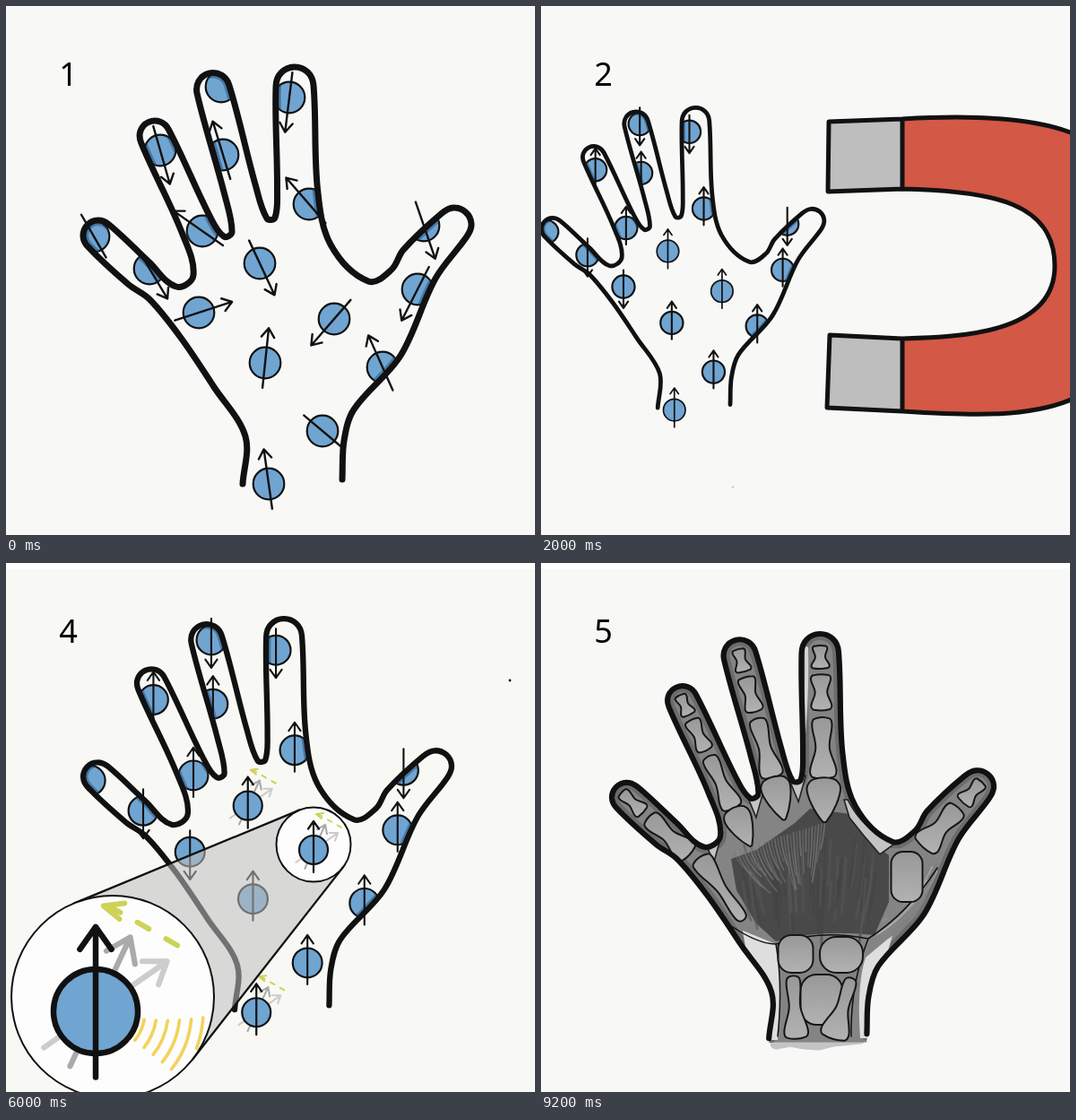
These frames come from a looping animation (590x590 px, 10000 ms). An HTML page:

```html
<!DOCTYPE html>
<html lang="en">
<head>
<meta charset="utf-8">
<title>How an MRI scan works</title>
<style>
  html, body { margin: 0; width: 100%; height: 100%; overflow: hidden; background: #f8f8f6; }
  svg { display: block; width: 590px; height: 590px; }
  .scene { visibility: hidden; animation: show 10s step-end infinite; }
  @keyframes show { 0% { visibility: visible; } 20%, 100% { visibility: hidden; } }
  text { font: 36px "Noto Sans", "Open Sans", sans-serif; fill: #000; text-anchor: middle; }
  .ink { fill: none; stroke: #111; stroke-linecap: round; stroke-linejoin: round; }
  .blue { fill: #70a4d1; stroke: #111; }
  .lens { fill: #fdfdfd; stroke: #111; stroke-width: 2; }
  .bone { fill: url(#boneTone); stroke: #161616; stroke-width: 2; }
</style>
</head>
<body>
<svg id="stage" viewBox="0 0 590 590"></svg>
<script>
// Each finger: tip x, y, radius, then base x, y, radius; pinky to thumb
const FINGERS = [
  [103, 256, 17, 148, 298, 17],
  [166, 145, 17, 212, 244, 18],
  [231, 93, 18.5, 261, 205, 18],
  [322, 89, 21, 325, 205, 22.5],
  [500, 244, 19, 461, 288, 24]
];
const WRIST = [[264, 533], [267, 480], [232, 425], [195, 370], [160, 327]];
// Skin that follows each finger
const GAPS = [
  [[190, 313], [209, 300]],
  [[243, 257], [252, 252]],
  [[291, 237], [300, 236]],
  [[362, 266], [404, 307], [430, 294]],
  [[440, 390], [388, 450], [377, 485], [375, 528]]
];

// Each spin: x, y, random heading in degrees, then +1 or -1 once aligned, or TUNED
const TUNED = 2;
const ZOOMED = [366, 349, 221, TUNED];
const SPINS = [
  [98, 257, 150, 0, 'bare'], [172, 161, 164, 1], [240, 90, null, -1], [242, 166, -17, 1],
  [316, 102, 187, -1], [338, 221, -41, 1], [219, 251, -55, 1], [160, 293, 149, -1],
  [283, 287, 155, TUNED], [215, 342, 72, -1], ZOOMED, [289, 398, 6, 1], [293, 533, -8, TUNED],
  [353, 474, -50, 1, 'bare'], [459, 316, 207, 1], [420, 403, -24, 1], [466, 245, 161, -1]
];

// Smooth curve through points, with handles a third of each segment
function smooth(p, closed) {
  const n = p.length;
  const at = i => closed ? p[(i + n) % n] : p[Math.max(0, Math.min(n - 1, i))];
  const handle = (i, len) => {
    const dx = at(i + 1)[0] - at(i - 1)[0], dy = at(i + 1)[1] - at(i - 1)[1];
    const k = len / 3 / (Math.hypot(dx, dy) || 1);
    return [dx * k, dy * k];
  };
  let d = 'M' + p[0];
  for (let i = 0; i < (closed ? n : n - 1); i++) {
    const a = at(i), b = at(i + 1), len = Math.hypot(b[0] - a[0], b[1] - a[1]);
    const h = handle(i, len), g = handle(i + 1, len);
    d += `C${[a[0] + h[0], a[1] + h[1], b[0] - g[0], b[1] - g[1], ...b].map(v => v.toFixed(1))}`;
  }
  return d + (closed ? 'Z' : '');
}

function fingerEdge([tx, ty, r, bx, by, br]) {
  const len = Math.hypot(tx - bx, ty - by), ux = (tx - bx) / len, uy = (ty - by) / len;
  const tip = [0, 1, 2, 3, 4].map(i => {
    const c = r * Math.cos(i * Math.PI / 4), s = r * Math.sin(i * Math.PI / 4);
    return [tx + uy * c + ux * s, ty - ux * c + uy * s];
  });
  return [[bx + uy * br, by - ux * br], ...tip, [bx - uy * br, by + ux * br]];
}

const OUTLINE = [...WRIST, ...FINGERS.flatMap((f, i) => [...fingerEdge(f), ...GAPS[i]])];

function makeHand(sx, sy, tx, ty, wrist = 583) {
  const place = ([x, y]) => [x * sx + tx, y * sy + ty];
  const line = smooth(OUTLINE.map(place));
  return { line, place, scale: sx, area: `${line}L${place([375, wrist])}L${place([264, wrist])}Z` };
}

const ink = (d, w, color = '#111', extra = '') =>
  `<path class="ink" d="${d}" stroke-width="${w}" style="stroke:${color}" ${extra}/>`;
const disc = (x, y, r, extra = '') => `<circle cx="${x}" cy="${y}" r="${r}" ${extra}/>`;
const shift = (x, y, rest, body) => `<g transform="translate(${x} ${y}) ${rest}">${body}</g>`;
const paper = (color, strip) => `<rect width="590" height="590" fill="${color}"/>` +
  (strip ? '<rect width="590" height="6.5" fill="#fff"/>' : '');
const speck = disc(562, 131, 1.4, 'fill="#111"');

// Arrow through a point, pointing up at 0 degrees
function needle(x, y, deg, tail, head, w, barb, color) {
  const tip = barb ? `M${-barb * .6} ${barb * .85 - head}L0 ${-head}L${barb * .6} ${barb * .85 - head}` : '';
  return shift(x, y, `rotate(${deg})`, ink(`M0 ${tail}V${-head}${tip}`, w, color));
}

// Discs are cut off by the skin and shaded along it
function skinAndDiscs(id, hand, spots, edge) {
  const r = 17.3 * hand.scale;
  const discs = extra => spots.map(([x, y]) => disc(x, y, r, extra)).join('');
  return `<clipPath id="skin${id}"><path d="${hand.area}"/></clipPath>
    <clipPath id="discs${id}">${discs()}</clipPath>
    <g clip-path="url(#skin${id})">${discs('class="blue" stroke-width="2.2"')}
      <g clip-path="url(#discs${id})">${ink(hand.line, edge * 1.7, '#1f5078', 'opacity=".5"')}</g></g>
    ${ink(hand.line, edge)}`;
}

const tuned = (x, y, k, tilt, extra = '') => shift(x, y, `scale(${k})`,
  extra + disc(0, 0, 16, 'class="blue" stroke-width="2.2"') + needle(0, 0, tilt, 25, 32, 2.2, 10));

function alignedHand(id, hand, edge, tilt, extra) {
  const k = hand.scale / .949;
  const spots = SPINS.filter(s => s !== ZOOMED || !extra)
    .map(([x, y, , pole]) => [...hand.place([x - 3.5, y + 3.5]), pole]);
  const fixed = spots.filter(s => s[2] !== TUNED);
  return skinAndDiscs(id, hand, fixed, edge) +
    fixed.filter(s => s[2]).map(([x, y, pole]) =>
      needle(x, y, pole < 0 ? 180 : 0, 24 * k, 31 * k, 2.1, 11 * k)).join('') +
    spots.filter(s => s[2] === TUNED).map(([x, y]) => tuned(x, y, k, tilt, extra)).join('');
}

// Shaded band along the two outer tangents of a pair of circles
function beam([x1, y1, r1], [x2, y2, r2], fill, opacity, w) {
  const base = Math.atan2(y2 - y1, x2 - x1);
  const open = Math.acos((r1 - r2) / Math.hypot(x2 - x1, y2 - y1));
  const on = (x, y, r, s) => [x + r * Math.cos(base + s * open), y + r * Math.sin(base + s * open)];
  const [a, b, c, d] = [on(x1, y1, r1, -1), on(x2, y2, r2, -1), on(x2, y2, r2, 1), on(x1, y1, r1, 1)];
  return `<path d="M${a}L${b}L${c}L${d}Z" fill="${fill}" fill-opacity="${opacity}"/>` + ink(`M${a}L${b}M${c}L${d}`, w);
}
const lens = circle => disc(...circle, 'class="lens"');

function randomSpins() {
  const hand = makeHand(1, 1, 0, 0);
  return paper('#f8f8f7') + skinAndDiscs('A', hand, SPINS, 7) +
    SPINS.filter(s => s[2] !== null).map(([x, y, deg, , bare]) =>
      needle(x, y, deg, 28, bare ? 27 : 39, 2.4, bare ? 0 : 12)).join('');
}

function magnetField() {
  const inner = 'C470 369 573 365 573 290C573 220 505 206 403 204';
  const poles = 'M321 129L403 126V204L320 207ZM322 367L403 371V452L319 448Z';
  return paper('#f8f8f7') +
    `<path d="M403 126C470 122 550 122 600 145V435C550 460 480 457 403 452V371${inner}Z" fill="#d35846"/>
     <path d="${poles}" fill="#bebebe"/>` +
    ink(`${poles}M403 126C470 122 550 122 600 145M403 452C480 457 550 460 600 435M403 371${inner}`, 5) +
    alignedHand('B', makeHand(.728, .72, -62, 64.3), 4.8, 0) + ink('M213 537L215 536', 1, '#aaa');
}

function radioWaves() {
  const hand = makeHand(.949, .9375, 5.5, -1.7);
  const big = [137, 453, 83], small = [347, 311, 38.5];
  const push = ink('M-11-36v8M-11-32h17m-5-5l5 5l-5 5', 1.8, '#d9773f');
  let waves = '';
  for (let i = 1; i <= 7; i++) {
    const r = 360 + 16 * i * i;
    waves += disc(97 * i - 75 - r, 360, r, 'fill="none" stroke="#f6d163" stroke-width="16"');
  }
  return paper('#f8f8f7') + waves + '<rect width="590" height="6.5" fill="#fff"/>' +
    `<path d="${hand.area}" fill="#f8f8f7"/>` + beam(big, small, '#ccc', .8, 1.5) +
    alignedHand('C', hand, 6.3, 25, push) +
    lens(small) + tuned(346, 313, 1, 26, push) +
    lens(big) + tuned(135, 461, 2.2, 26, push) + disc(327, 381, 1) + speck;
}

function relaxing() {
  const big = [119, 484, 113], small = [343, 314, 41.5];
  const trail = needle(0, 0, 55, 24, 33, 2.1, 9, '#ccc') + needle(0, 0, 25, 23, 31, 2.1, 10, '#aaa') +
    ink('M31-25L5-40', 2, '#ced256', 'stroke-dasharray="5 7.5"') + ink('M11-41L3-40L9-35', 2, '#ced256');
  let echo = '';
  for (let i = 0; i < 6; i++) {
    const r = 52 + 13 * i;
    const at = a => [103 + r * Math.cos(a), 500 + r * Math.sin(a)];
    echo += ink(`M${at(.18 - i * .024)}A${r} ${r} 0 0 1 ${at(i < 5 ? .67 : .36)}`, 3.6, '#f1d35c');
  }
  return paper('#f8f8f4', true) +
    alignedHand('D', makeHand(.949, .9375, 4.5, -1.7), 6.3, 0, trail) +
    beam(big, small, '#c0c0c0', .55, 2.3) +
    lens(small) + tuned(343, 320, 1, 0, trail) +
    lens(big) + echo + tuned(100, 500, 2.94, 0, trail) + speck;
}

// Bone shapes: position along the axis and relative width
const HOURGLASS = [[0, .8], [.12, 1], [.5, .6], [.88, 1], [1, .75]];
const DROP = [[0, .6], [.2, 1], [.6, .75], [1, .12]];

function bone([x1, y1], [x2, y2], w1, w2, shape) {
  const len = Math.hypot(x2 - x1, y2 - y1), nx = (y1 - y2) / len, ny = (x2 - x1) / len;
  const side = s => shape.map(([t, k]) => {
    const w = s * k * (w1 + (w2 - w1) * t) / 2;
    return [x1 + (x2 - x1) * t + nx * w, y1 + (y2 - y1) * t + ny * w];
  });
  return `<path class="bone" d="${smooth([...side(1), ...side(-1).reverse()], true)}"/>`;
}
const pebble = (x, y, w, h) =>
  `<rect class="bone" x="${x - w / 2}" y="${y - h / 2}" width="${w}" height="${h}" rx="${w * .38}"/>`;

// Finger bones lie along the finger's axis at fixed fractions of its length
function fingerBones(hand, [tx, ty, r, bx, by], isLong) {
  const [x1, y1] = hand.place([tx, ty]), [x2, y2] = hand.place([bx, by]);
  const at = t => [x1 + (x2 - x1) * t, y1 + (y2 - y1) * t];
  const link = (t1, t2, w1, w2, shape = HOURGLASS) => bone(at(t1), at(t2), w1 * r, w2 * r, shape);
  return isLong
    ? link(-.06, .16, .75, 1) + link(.23, .57, 1.05, 1.1) + link(.66, 1.24, 1, 1.45) + link(1.26, 1.68, 1.8, 1.7, DROP)
    : link(-.12, .4, .8, 1.1) + link(.57, 1.55, 1.2, 1.7);
}

function scanImage() {
  const hand = makeHand(.984, .97, -5.6, 13, 538);
  const bones = FINGERS.map((f, i) => fingerBones(hand, f, i > 0 && i < 4)).join('') +
    bone([178, 330], [225, 397], 25, 12, HOURGLASS) + pebble(408, 350, 35, 56) +
    pebble(284, 436, 39, 42) + pebble(335, 437, 48, 40) + pebble(313, 487, 47, 56) +
    bone([281, 462], [285, 529], 14, 28, HOURGLASS) + bone([346, 464], [326, 529], 12, 34, HOURGLASS);

  let seed = 7;
  const rnd = () => (seed = seed * 16807 % 2147483647) / 2147483647;
  const streak = (x, y, dx, dy, c, w) => ink(`M${x} ${y}q${dx * .3} ${dy * .6} ${dx} ${dy}`, w, c, 'opacity=".55"');
  let grain = '';
  for (let i = 0; i < 50; i++) {
    const x = 225 + rnd() * 155;
    grain += streak(x, 300 + rnd() * 60, (300 - x) * .12, 30 + rnd() * 45, i % 2 ? '#434343' : '#575757', 3);
  }
  // Tendons fan out from the middle of the wrist
  for (let i = 0; i < 30; i++) {
    const x = 215 + i * 3.5, y = 322 - i * 1.1, k = .15 + rnd() * .35;
    grain += streak(x, y, (295 - x) * k, (425 - y) * k, i % 2 ? '#8c8c8c' : '#777', 1.5);
  }
  for (let i = 0; i < 12; i++) grain += streak(428 + rnd() * 18, 335 + rnd() * 25, -55, 60, i % 3 ? '#7c7c7c' : '#bbb', 2);

  const webs = GAPS.slice(0, 3).map(([a, b]) => {
    const [x, y] = hand.place([(a[0] + b[0]) / 2, (a[1] + b[1]) / 2]);
    return `M${x - 10} ${y - 5}H${x + 10}L${x + 2} ${y + 24}Z`;
  }).join('');

  return paper('#f8f8f6', true) +
    `<linearGradient id="boneTone" x2="0" y2="1"><stop stop-color="#989898"/><stop offset="1" stop-color="#b2b2b2"/></linearGradient>` +
    ink('M262 536L278 533L294 536L310 537L326 533L356 530', 13, '#c4c4c4') +
    `<clipPath id="skinE"><path d="${hand.area}"/></clipPath><g clip-path="url(#skinE)">
      <path d="${hand.area}" fill="#848484"/>${ink(hand.line, 14, '#6c6c6c')}
      <path d="M225 410L262 425Q270 460 264 532H245ZM392 415L362 440Q352 470 356 530H370L385 440Z" fill="#dedede"/>
      <path d="M212 330L240 320L283 290L300 274L345 280L362 306L388 326V378L372 415Q310 408 262 422L240 402L218 365Z" fill="#494949"/>
      ${grain}${ink('M296 95Q297 150 293 190', 4, '#d4d4d4')}
      <g fill="#c4c4c4" stroke="#222" stroke-width="1.6"><path d="${webs}"/>
        <path d="M338 264L344 284L360 304L378 325L396 312Q360 300 342 264Z"/></g></g>` +
    ink('M205 400Q240 425 262 425Q310 408 365 419Q410 390 442 340M262 425Q270 470 264 528M365 419Q345 470 346 528', 1.5) +
    bones + ink(hand.line, 6.2);
}

const scenes = [randomSpins, magnetField, radioWaves, relaxing, scanImage];
document.getElementById('stage').innerHTML = scenes.map((draw, i) =>
  `<g class="scene" style="animation-delay:${i * 2 - 10}s">${draw()}<text x="69.6" y="89">${i + 1}</text></g>`).join('');
</script>
</body>
</html>
```
